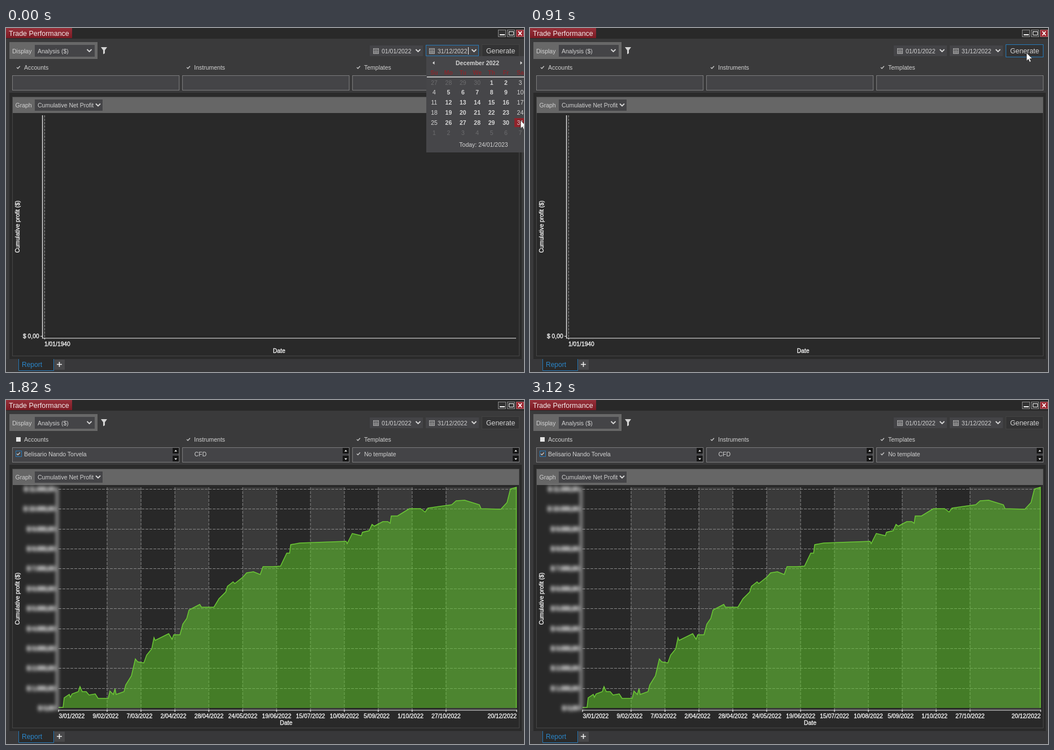
Animation, 917 px wide and 611 px high, one loop 3.25 s. Source, as an HTML page:

```html
<!DOCTYPE html>
<html lang="en">
<head>
<meta charset="utf-8">
<title>Trade Performance</title>
<style>
  html, body { margin: 0; width: 100%; height: 100%; overflow: hidden; background: #3a3a3b; }
  svg { display: block; width: 917px; height: 611px; }
  text { font-family: "Liberation Sans", Arial, sans-serif; font-size: 10.5px; fill: #d2d2d2; white-space: pre; }
  .axis text { font-size: 10.3px; fill: #f6f6f6; stroke: #f6f6f6; stroke-width: .35px; }
  .axis.blurred text { stroke-width: 1px; }
</style>
</head>
<body>
<svg id="stage" viewBox="0 0 917 611" xmlns="http://www.w3.org/2000/svg">
  <defs>
    <linearGradient id="red" x2="0" y2="1"><stop stop-color="#96303a"/><stop offset="1" stop-color="#7c1a23"/></linearGradient>
    <filter id="soft" x="-20%" y="-5%" width="140%" height="110%"><feGaussianBlur stdDeviation="3.2"/></filter>
  </defs>
</svg>
<script>
const stage = document.getElementById('stage');
const BLUE = '#2679b8', FIELD = '#444447', WHITE = '#f0f0f0';

function add(parent, tag, attrs, content) {
  const node = document.createElementNS('http://www.w3.org/2000/svg', tag);
  for (const key in attrs) node.setAttribute(key, attrs[key]);
  if (content !== undefined) node.textContent = content;
  return parent.appendChild(node);
}
const group = (parent = stage, attrs = {}) => add(parent, 'g', attrs);
const rect = (g, x, y, width, height, fill) => add(g, 'rect', { x, y, width, height, fill });
const frame = (g, x, y, width, height, stroke, fill = 'none') =>
  add(g, 'rect', { x: x + .5, y: y + .5, width: width - 1, height: height - 1, fill, stroke });
const path = (g, d, stroke, width = 1, fill = 'none') =>
  add(g, 'path', { d, stroke, 'stroke-width': width, fill });
const shape = (g, d, fill) => add(g, 'path', { d, fill });
const text = (g, x, y, label, attrs = {}) => add(g, 'text', { x, y, ...attrs }, label);
const chevron = (g, x, y) => path(g, `M${x - 4} ${y - 2}l4 4 4-4`, '#d8d8d8', 1.8);
const check = (g, x, y) => path(g, `M${x - 3} ${y}l2 2 3.8-4.2`, '#c8c8c8', 1.4);

// Window
const base = group();
rect(base, 0, 0, 917, 611, '#3a3a3b');
rect(base, 0, 0, 917, 19, '#292929');
rect(base, 0, 0, 117, 18, 'url(#red)');
text(base, 5, 14, 'Trade Performance', { style: 'font-size:12.45px;fill:#f3eaea' });
frame(base, 871, 3, 14, 13, '#8c8c8c', '#333');
rect(base, 874, 11, 9, 2, WHITE);
frame(base, 887, 3, 14, 13, '#8c8c8c', '#333');
path(base, 'M890 6.5h9M890.5 6v6.5h8V6', WHITE);
frame(base, 903, 3, 14, 13, '#b06a71', '#9c2630');
path(base, 'M907 6l6 7M913 6l-6 7', '#fff', 1.8);

// Toolbar
rect(base, 6, 25, 156, 30, '#686868');
text(base, 11, 44.5, 'Display');
rect(base, 51, 30, 106, 21, FIELD);
text(base, 56, 44.5, 'Analysis ($)');
chevron(base, 147.5, 40);
shape(base, 'M168 34h11l-4 5.5V45l-3 1.5v-7z', '#d4d4d4');
for (const [x, date] of [[644, '01/01/2022'], [743, '31/12/2022']]) {
  rect(base, x, 31, 94, 19, FIELD);
  frame(base, x + 6, 36, 10, 10, '#b0b0b0');
  path(base, `M${x + 6} 38.5h10M${x + 7} 41.5h8M${x + 7} 43.5h8M${x + 9.5} 39v6M${x + 12.5} 39v6`, '#9c9c9c');
  text(base, x + 21, 44.5, date);
  chevron(base, x + 85.5, 40);
}
frame(base, 842, 29, 67, 23, '#424242', '#333334');
text(base, 850, 45.2, 'Generate', { style: 'font-size:12.3px' });

// Filter lists
['Accounts', 'Instruments', 'Templates'].forEach((label, i) => {
  const x = 11 + 301 * i;
  text(base, x + 21, 74, label);
  frame(base, x, 84, 296, 27, '#7c7c7d', FIELD);
  if (i) check(base, x + 11, 70);
});

// Report panel
rect(base, 6, 115, 907, 473, '#2a2a2a');
frame(base, 11, 122, 898, 461, '#464646', '#292929');
rect(base, 12, 123, 896, 28, '#666');
text(base, 16.5, 141, 'Graph');
rect(base, 51, 127, 120, 20, FIELD);
text(base, 56, 141, 'Cumulative Net Profit');
chevron(base, 163, 136.5);
rect(base, 0, 588, 917, 23, '#38383a');
rect(base, 22, 588, 62, 21, '#2a2a2a');
path(base, 'M22.5 588v20.5h62V588', BLUE);
text(base, 28, 602, 'Report', { style: 'font-size:12px;fill:#2b86c9' });
rect(base, 86, 589, 18, 18, '#48484a');
path(base, 'M90 597.5h9M94.5 593v9', WHITE, 1.6);
const title = group(base, { class: 'axis' });
text(title, 24, 353, 'Cumulative profit ($)', { 'text-anchor': 'middle', transform: 'rotate(-90 24 353)' });

// Before the report is generated
const empty = group();
const emptyAxis = group(empty, { class: 'axis' });
check(empty, 22, 70);
rect(empty, 65, 155, 3, 396, '#3a3a3a');
path(empty, 'M66 547.5H903', '#222');
path(empty, 'M68.5 155V550', '#858585').setAttribute('stroke-dasharray', '4 2');
path(empty, 'M64.5 155V551M61 547.5h4M64 551H903M68.5 551v2', WHITE, 1.2);
text(emptyAxis, 30, 551, '$ 0,00');
text(emptyAxis, 68, 565, '1/01/1940');
text(emptyAxis, 483.5, 577, 'Date', { 'text-anchor': 'middle' });

// Generated report
const report = group();
rect(report, 18, 66, 8, 8, '#e4e4e4');
frame(report, 17, 90, 11, 11, BLUE);
check(report, 22, 95.5);
check(report, 624, 95.5);
text(report, 32, 99.5, 'Belisario Nando Torvela');
text(report, 333.5, 99.5, 'CFD');
text(report, 634, 99.5, 'No template');
for (const x of [295, 596, 897]) {
  rect(report, x, 85, 11, 10, '#161616');
  rect(report, x, 99, 11, 10, '#161616');
  shape(report, `M${x + 3} 91.5l2.5-3 2.5 3zM${x + 3} 103.5l2.5 3 2.5-3z`, '#eee');
}
const gridX = i => 179 + 59.97 * i;
const gridY = i => 547 - 35.36 * i;
const edges = [93, ...Array.from({ length: 11 }, (_, i) => gridX(i)), 904];
for (let i = 0; i < 12; i++)
  rect(report, edges[i], 155, edges[i + 1] - edges[i], 395, i % 2 ? '#3a3a3a' : '#282828');
let grid = '';
for (let i = 1; i < 12; i++) grid += `M${Math.round(edges[i])} 155V550M93 ${Math.round(gridY(i)) + .5}H904`;
path(report, grid, '#888').setAttribute('stroke-dasharray', '5 2');
const profit = `M93 546H101L103 529 112 523 114 528 117 522 128 518 131 509 135 518H142L147 524 158 522
  163 530H181L184 517 190 523 193 513 195 523 209 518 212 506 222 490 229 460 233 465 244 467
  249 453 258 442 262 422 264 427 288 415 294 425 297 417H308L313 398 320 388 324 373 343 363
  346 368H368L377 353 389 341 392 331 402 323 405 326 420 314 426 307 438 305 450 310 455 296H473
  L486 295 497 272H502L504 257 520 254 602 251 604 255 613 237 629 241 631 235 643 232 648 221
  652 224 667 216H676L680 219 682 206H693L714 193H734L742 199 747 192 789 186 797 179 812 178
  838 186 841 193 876 194 887 182 893 158 903.5 155`;
shape(report, `${profit}V547H93z`, 'rgba(96,208,38,.5)');
path(report, `${profit}V547`, '#6cc836', 1.5);
path(report, edges.reduce((d, x) => d + `M${Math.round(x)} 550v4`, 'M93 551H904'), WHITE, 1.2);

const dates = group(report, { class: 'axis' });
['9/02', '7/03', '2/04', '28/04', '24/05', '19/06', '15/07', '10/08', '5/09', '1/10', '27/10']
  .forEach((day, i) => text(dates, gridX(i) - 25.5, 565, day + '/2022'));
text(dates, 93.5, 565, '3/01/2022');
text(dates, 904, 565, '20/12/2022', { 'text-anchor': 'end' });
text(dates, 496, 577, 'Date', { 'text-anchor': 'middle' });

const amounts = group(report, { class: 'axis blurred', filter: 'url(#soft)' });
for (let i = 0; i < 12; i++) {
  text(amounts, 86, gridY(i) + 4, i ? `$ ${i}.000,00` : '$ 0,00', { 'text-anchor': 'end' });
  rect(amounts, 86, gridY(i), 6, 1, WHITE);
}
rect(amounts, 89, 155, 3, 396, '#ccc');

// Input focus
const focus = group();
frame(focus, 743, 30, 94, 20, BLUE);
path(focus, 'M818.5 34v13', WHITE);
const hover = frame(stage, 842, 29, 67, 23, BLUE);

// Date picker
const calendar = group();
const middle = 'text-anchor:middle;';
rect(calendar, 744, 50, 173, 171, '#464649');
shape(calendar, 'M758.5 59v6l-3.5-3zM910.5 59v6l3.5-3z', '#ddd');
text(calendar, 834.5, 65.5, 'December 2022', { style: middle + 'font-weight:bold' });
path(calendar, 'M745 87H917', '#dedede', 1.3);
rect(calendar, 900, 160, 17, 16, '#8f232b');
['Su', 'Mo', 'Tu', 'We', 'Th', 'Fr', 'Sa'].forEach((day, i) =>
  text(calendar, 758 + 25.4 * i, 83, day, { style: middle + 'font-weight:bold;fill:#84292e' }));
for (let i = 0; i < 42; i++) {
  const col = i % 7, row = Math.floor(i / 7), day = i - 3;
  const inside = day > 0 && day < 32;
  const weight = inside && col > 0 && col < 6 ? 'bold' : 'normal';
  const label = day < 1 ? day + 30 : day > 31 ? day - 31 : day;
  text(calendar, 758 + 25.4 * col, 100.5 + 17.8 * row, label,
    { style: `${middle}font-weight:${weight};fill:${inside ? '#d6d6d6' : '#6c6c6e'}` });
}
text(calendar, 845.5, 210.5, 'Today: 24/01/2023', { style: middle });

const cursor = path(stage, 'M0 0V14.5L3.3 11.5 5.5 16.5 8 15.4 5.8 10.6H10.2Z', '#222', .7, '#fff');

// Pointer stops: [time, x, y]; each holds until the next
const LOOP = 3250;
const stops = [[0, 911, 164], [390, 909, 150], [520, 902, 114], [650, 890, 72],
  [780, 880, 46], [910, 879, 44], [1040, 152, 464]];
const show = (node, on) => { node.style.display = on ? '' : 'none'; };

function draw(t) {
  const [, x, y] = stops.filter(stop => stop[0] <= t).pop();
  cursor.setAttribute('transform', `translate(${x} ${y})`);
  show(cursor, t < 1170);
  show(calendar, t < 130);
  show(focus, t < 780);
  show(hover, t >= 780 && t < 1040);
  show(empty, t < 1040);
  show(report, t >= 1040);
}

const start = performance.now();
function tick() {
  draw((performance.now() - start) % LOOP);
  requestAnimationFrame(tick);
}
draw(0);
requestAnimationFrame(tick);
</script>
</body>
</html>
```
